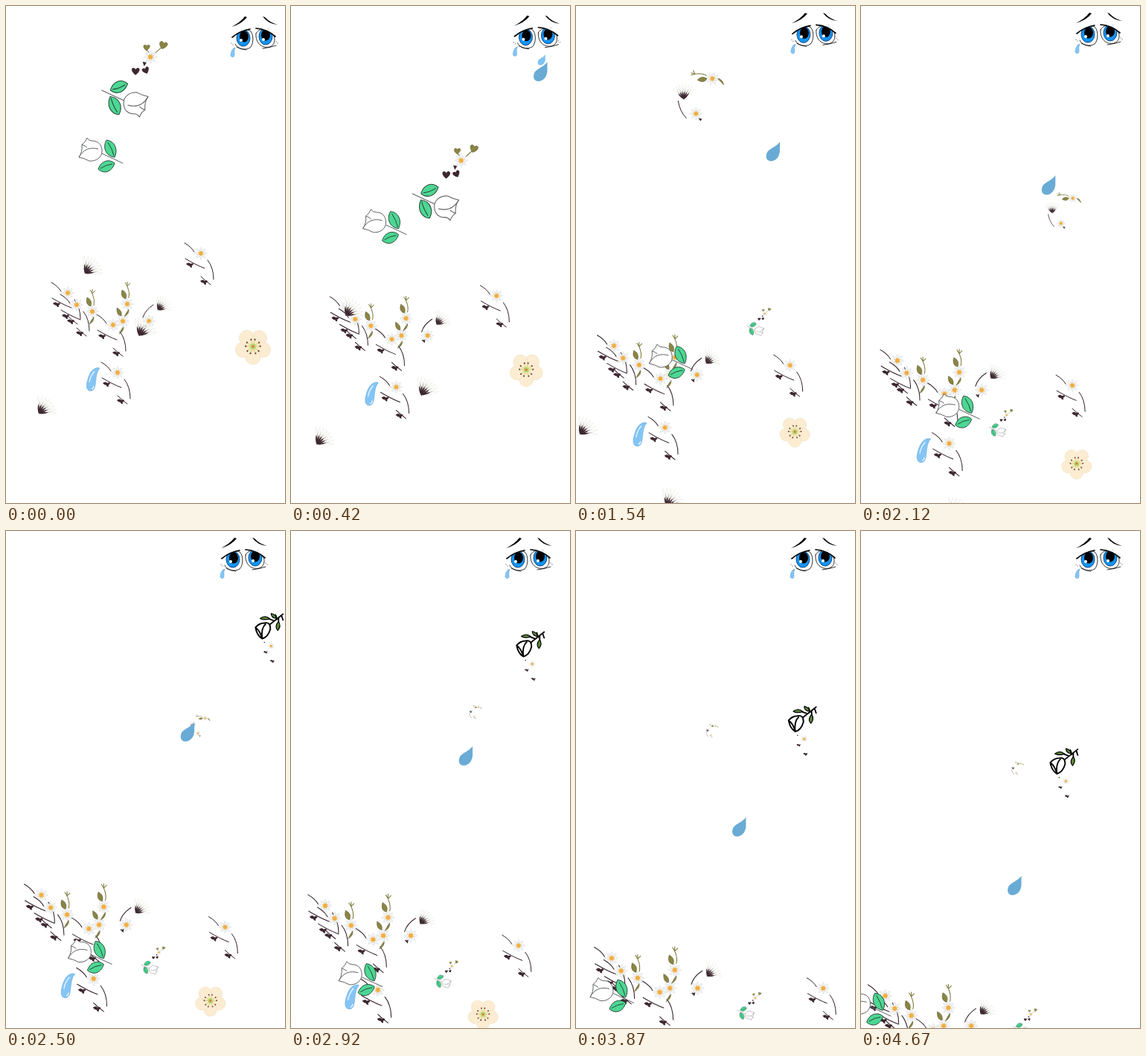
Animation of 375x667 px, one loop 4710 ms. Source, as an HTML page:

```html
<!DOCTYPE html>
<html lang="en">
<head>
<meta charset="utf-8">
<title>Falling flowers</title>
<style>
html, body { margin: 0; width: 100%; height: 100%; overflow: hidden; background: #fff; }
svg { display: block; width: 375px; height: 667px; }
.line { fill: none; stroke: #35202a; stroke-width: 1; stroke-linecap: round; }
.dark { fill: #3d2731; }
.olive { fill: #8a8543; stroke: #57532a; stroke-width: .5; }
.stem { fill: none; stroke: #7d7a3a; stroke-width: 1; }
.ink { fill: none; stroke: #000; stroke-width: .8; stroke-linecap: round; }
.edge { fill: #fff; stroke: #606365; stroke-width: 1; stroke-linejoin: round; }
.leaf { fill: #4dd793; stroke: #27483a; stroke-width: 1; }
.bold { fill: #fff; stroke: #000; stroke-width: 1.9; stroke-linejoin: round; }
.tear { fill: #84c5f5; stroke: #69a8da; stroke-width: .6; }
</style>
</head>
<body>
<svg viewBox="0 0 375 667">
<defs>
  <g id="daisy">
    <g data-ring="8 0 45"><path d="M0 0Q-3 -5 0 -8.5Q3 -5 0 0" fill="#f3f4f4" stroke="#d3d9dd" stroke-width=".5"/></g>
    <g data-ring="8 22 45"><path d="M0 0V-4" stroke="#f4c46c" stroke-width="1"/></g>
    <circle r="2.7" fill="#f0ae42"/>
  </g>

  <path id="knot" class="dark" d="M-6 -1Q-2 -4 0 -1Q4 -3 4 0Q1 1 2 4Q-1 4 -1 2Q-4 2 -6 -1Z"/>
  <path id="heart" d="M0 5C-7 0 -5 -5 -2 -4Q0 -4 0 -2Q2 -5 4 -4C7 -2 4 2 0 5"/>

  <g id="sprig">
    <path class="line" d="M-22 -14Q-13 -9 -9 -2M-21 7Q-6 16 5 20M9 9Q17 19 17 35M0 31Q5 36 13 42"/>
    <use href="#knot" x="-14" y="15"/><use href="#knot" x="5" y="38"/>
    <use href="#daisy"/>
  </g>

  <g id="green">
    <path class="stem" d="M-3 -29L0 -24L4 -28M0 -30V-24Q4 -15 2 -8"/>
    <path class="olive" d="M-7 -19Q1 -15 -2 -7Q-10 -9 -7 -19M2 7Q3 13 -4 17Q-1 11 2 7"/>
    <use href="#daisy"/>
  </g>

  <g id="bud" transform="translate(-9 9)">
    <g data-ring="8 -2 13"><path d="M0 0Q-3 -14 0 -24Q3 -14 0 0" fill="#fff" stroke="#e6e6e0" stroke-width=".5"/></g>
    <g data-ring="6 6 15"><path d="M0 0Q-1.5 -9 0 -18Q1.5 -9 0 0" fill="#aaa89c"/></g>
    <g data-ring="6 -2 17"><path class="dark" d="M0 0Q-2.2 -6 0 -13Q2.2 -6 0 0"/></g>
  </g>

  <g id="rose">
    <path class="edge" d="M14 5L42 18"/>
    <path class="edge" d="M14 2C14 10 6 16 -3 15Q-10 11 -17 10Q-12 3 -13 -7Q-9 -9 -6 -16Q-4 -12 1 -12C9 -12 14 -7 14 2Z"/>
    <path class="edge" style="fill:none" d="M-17 10C-11 -1 -2 -4 9 -1M-13 -7Q-8 -5 -6 -3"/>
    <path class="leaf" d="M20 -13C31 -12 36 -1 31 10C18 8 15 -4 20 -13M22 -10Q28 -1 30 8M31 18C24 12 13 14 9 26C17 33 27 30 31 18M28 19Q19 20 12 25"/>
  </g>

  <path id="drop" d="M9 -13V0C8 8 3 13 -3 13C-9 13 -11 7 -8 1C-5 -4 4 -6 9 -13"/>
</defs>

<g data-path="0 83 385, 1.54 51 456, 2.92 46 503, 3.87 48 573, 4.7 32 626" data-size="1 1.06 0 3.5">
  <g transform="translate(-83 -385)">
    <use href="#sprig" x="83" y="385"/><use href="#sprig" x="95" y="401"/>
    <use href="#sprig" x="144" y="428"/><use href="#sprig" x="150" y="492"/>
    <use href="#green" x="116" y="410"/><use href="#green" x="163" y="400"/>
    <path class="olive" d="M149 405Q157 409 155 416Q148 415 149 405M158 430Q159 436 152 440Q155 434 158 430"/>
    <use href="#daisy" x="157" y="423"/>
    <g transform="translate(192 423)">
      <path class="line" d="M-8 -5Q-5 -15 6 -22"/>
      <path class="dark" d="M-8 6L-3 5L-4 10Z"/>
      <use href="#bud" transform="translate(19 -22) scale(.78)"/>
      <use href="#daisy"/>
    </g>
    <g transform="translate(117 501)">
      <path class="tear" d="M9 -15C3 -17 -4 -12 -7 0C-11 12 -7 17 -1 15C6 12 1 -6 9 -15"/>
      <path d="M2 -11Q-4 -4 -5 4M1 9Q1 12 -2 13" fill="none" stroke="#e9f6ff" stroke-width="1.3"/>
    </g>
  </g>
</g>

<g data-path="0 262 332, .87 292 451, 2.12 284 509, 3.87 332 613, 4.7 385 735"><use href="#sprig"/></g>

<g data-path="0 115 350, .87 47 468, 2.12 -14 650"><use href="#bud"/></g>
<g data-path="0 186 432, .87 178 599, 1.54 129 661, 2.5 131 680"><use href="#bud" transform="rotate(-10)"/></g>
<g data-path="0 53 538, .87 33 624, 1.54 10 690"><use href="#bud"/></g>

<g data-path="0 332 457, .87 299 522, 2.12 290 614, 3.87 220 690" data-size="1.17 1 0 .87">
  <g data-ring="5 36 72"><circle cy="-12" r="8.7" fill="#fbecd2" stroke="#f3e2c3" stroke-width=".6"/></g>
  <circle r="6" fill="#f7eab8"/>
  <g data-ring="5 0 72"><path d="M0 0L-2 -7M0 0L2 -7" stroke="#c9cf86" stroke-width=".7"/><circle cx="-2.2" cy="-8" r="1" fill="#75452f"/><circle cx="2.2" cy="-8" r="1" fill="#75452f"/></g>
  <circle r="3.2" fill="#b4d36c"/><circle r="1.4" fill="#e2704c"/>
</g>

<g data-path="0 115 193, .87 112 393, 2.12 118 536, 2.92 81 594, 4.7 -3 634"><use href="#rose"/></g>

<g data-path="0 173 132, .87 245 422, 1.54 246 436, 2.12 188 572, 3.87 233 650, 4.7 220 673" data-size="1.06 .39 .87 1.54">
  <use href="#rose" transform="rotate(180)"/>
  <path class="stem" d="M26 -65L35 -73M14 -70L18 -66"/>
  <use href="#heart" class="olive" transform="translate(36 -75) rotate(15)"/>
  <use href="#heart" class="olive" transform="translate(15 -72) scale(.8)"/>
  <use href="#heart" class="dark" x="1" y="-42"/>
  <use href="#heart" class="dark" transform="translate(14 -43) rotate(-25) scale(.9)"/>
  <path class="dark" d="M10 -54L15 -53L12 -48Z"/>
  <use href="#daisy" x="20" y="-60"/>
</g>

<g data-path="0 343 -143, 1.54 161 144, 2.12 269 292, 2.92 246 249, 3.87 181 274, 4.7 210 327" data-size="1 .27 1.54 2.92">
  <path class="line" d="M-24 -17Q-22 -3 -13 6"/>
  <path class="dark" d="M3 6L8 7L6 10Z"/>
  <use href="#bud" transform="translate(-16 -30) rotate(-43) scale(.85)"/>
  <use href="#green" transform="translate(22 -47) rotate(-75)"/>
  <use href="#daisy"/>
</g>

<g data-path="2.17 388 108, 2.74 316 152, 3.25 311 168, 3.95 295 269, 4.7 264 317">
  <path class="ink" style="stroke-width:1.8" d="M7 -7L26 -22M18 -15L16 -21M20 -17L20 -10M14 -13L6 -16M24 -20L26 -14"/>
  <path class="bold" d="M-11 -4Q-6 -10 1 -10Q9 -12 9 -2Q6 9 -2 11Q-9 7 -11 -4ZM-11 -4Q-5 0 -2 11Q-4 -3 3 -9"/>
  <path d="M-5 -16Q2 -21 8 -16Q2 -13 -5 -16M10 -23Q17 -21 17 -16Q10 -17 10 -23M20 -12Q24 -6 19 0Q14 -5 20 -12" fill="#5d8a3c" stroke="#000" stroke-width="1.2"/>
  <use href="#daisy" transform="translate(10 21) scale(.55)"/>
  <use href="#knot" transform="translate(3 29) scale(.55)"/><use href="#knot" transform="translate(12 41) scale(.6)"/>
  <circle class="dark" cx="1" cy="16" r=".8"/>
</g>

<g data-path="0 390 0, .87 279 151, 1 275 158" data-size=".55 0 .87 1"><use href="#drop" fill="#7fc3f3"/></g>
<g data-path="0 392 10, .87 274 173, 1.54 265 195, 2.92 235 302, 4.7 206 479"><use href="#drop" fill="#69abd5"/></g>

<g data-path="0 334 42, 1.65 320 37">
  <path d="M-31 -14Q-19 -20 -13 -28L-10 -27Q-17 -18 -31 -14M11 -28L14 -27Q20 -20 31 -17Q18 -18 11 -28"/>
  <path class="ink" d="M-27 -2C-22 -10 -10 -13 -5 -8C-1 -3 -1 9 -6 14C-13 18 -23 16 -26 9M2 -5C5 -12 19 -14 25 -5C29 3 27 11 20 13C10 15 1 8 2 -5"/>
  <g fill="#1593f0" stroke="#063e78" stroke-width=".9">
    <ellipse cx="-15" cy="1" rx="9" ry="11"/><ellipse cx="15" cy="-1" rx="9" ry="11"/>
  </g>
  <ellipse cx="-14" cy="-1" rx="6" ry="7.5"/><ellipse cx="15" cy="-3" rx="6" ry="7.5"/>
  <g fill="#fff">
    <circle cx="-18" cy="4" r="2"/><circle cx="12" cy="3" r="2"/>
    <path d="M-29 -2Q-18 -10 -6 -11L-10 -14L-28 -6ZM2 -12Q18 -11 28 -1V-6L14 -14Z"/>
  </g>
  <path class="ink" style="stroke-width:1.7" d="M-30 0Q-19 -9 -6 -11M2 -12Q17 -11 28 -1"/>
  <path class="ink" d="M-24 13Q-18 16 -11 17M11 15Q20 14 29 11M-31 8h.1M-29 10h.1M29 6h.1M31 8h.1"/>
  <path class="tear" d="M-26 14Q-29 14 -31 19Q-33 25 -31 26Q-27 28 -27 23Q-28 18 -26 14"/>
</g>
</svg>

<script>
const LOOP = 4710, FPS = 24;
const numbers = text => text.trim().split(/\s+/).map(Number);
const clamp = v => Math.min(1, Math.max(0, v));
const smooth = k => k * k * (3 - 2 * k);
const mix = (a, b, k) => a + (b - a) * k;

// data-ring repeats the content around its origin: count, first angle, step.
for (const el of document.querySelectorAll('[data-ring]')) {
  const [count, first, step] = numbers(el.dataset.ring);
  const part = el.innerHTML;
  el.innerHTML = Array.from({ length: count }, (_, i) =>
    `<g transform="rotate(${first + i * step})">${part}</g>`).join('');
}

// data-path: turning points as seconds, x, y. data-size: from, to, start, end.
const parts = [...document.querySelectorAll('[data-path]')].map(el => ({
  el,
  path: el.dataset.path.split(',').map(numbers),
  size: numbers(el.dataset.size || '1 1 0 1')
}));

function placeAt(path, t) {
  const i = Math.max(1, path.findLastIndex(([start]) => start <= t) + 1);
  const a = path[i - 1], b = path[i] || a;
  const k = clamp((t - a[0]) / (b[0] - a[0] || 1));
  return [mix(a[1], b[1], k), mix(a[2], b[2], k)];
}

function draw(ms) {
  const t = Math.floor((ms % LOOP + 5.01) * FPS / 1000) / FPS;
  for (const { el, path, size: [from, to, start, end] } of parts) {
    const scale = mix(from, to, smooth(clamp((t - start) / (end - start))));
    el.setAttribute('transform', `translate(${placeAt(path, t)}) scale(${scale})`);
  }
}

const begin = performance.now();
function tick() {
  draw(performance.now() - begin);
  requestAnimationFrame(tick);
}
tick();
</script>
</body>
</html>
```
